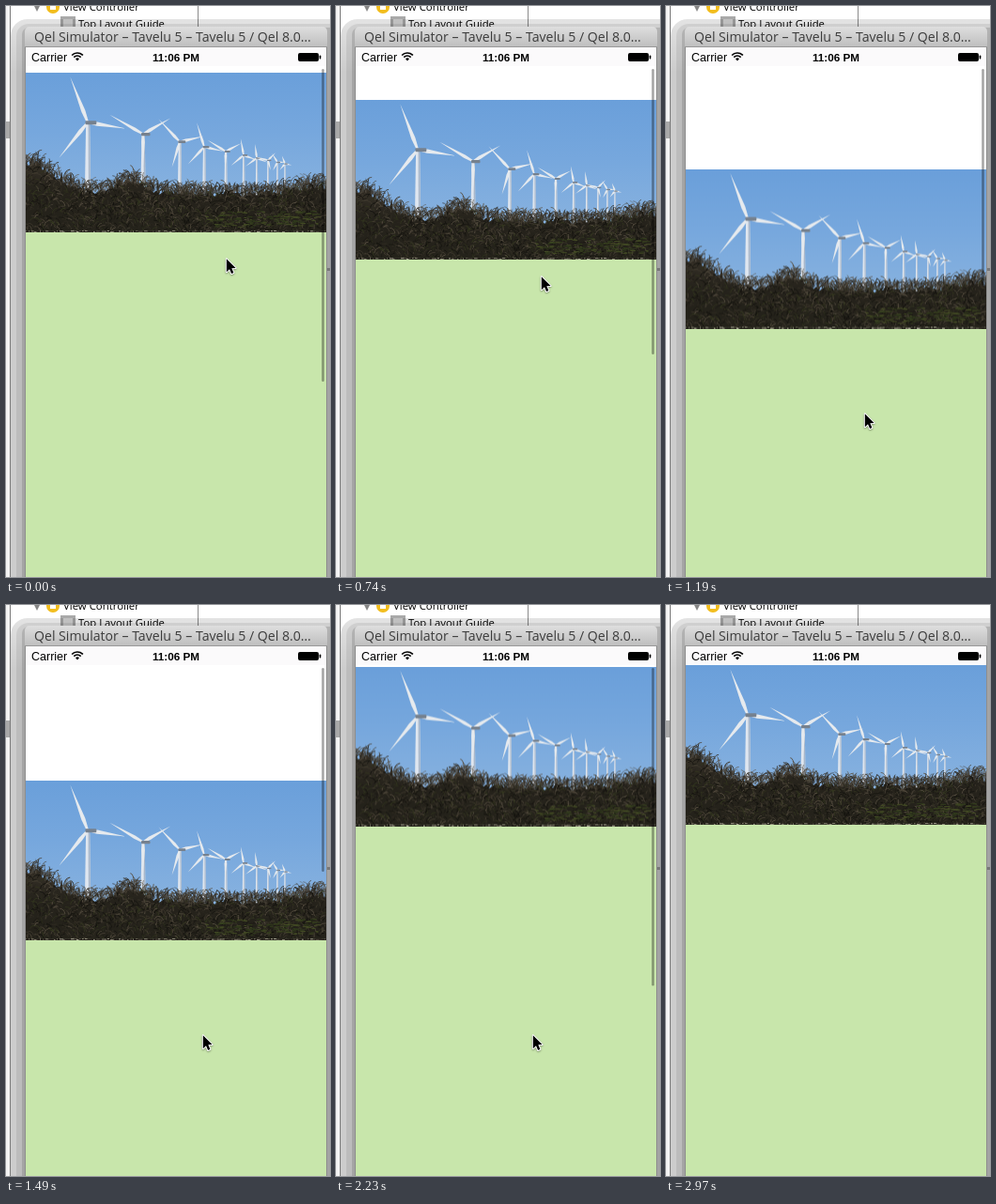
An HTML page with a canvas that plays this animation: 345 by 608 pixels, repeating every 3.25 s.

```html
<!DOCTYPE html>
<html lang="en">
<head>
<meta charset="utf-8">
<title>Pull to scroll</title>
<style>
  html, body { margin: 0; width: 100%; height: 100%; overflow: hidden; background: #fff; }
  canvas { display: block; width: 345px; height: 608px; }
</style>
</head>
<body>
<canvas id="stage" width="345" height="608"></canvas>
<script>
const W = 345, H = 608, LOOP = 3250;
const TICK = 148.5;   // the screen refreshes in even ticks
const REST = 64;      // photo top when nothing is pulled
const RELEASE = 13;   // tick at which the photo springs back
const ctx = document.getElementById('stage').getContext('2d');

// key points by tick: pulled distance, then pointer position
const PULL = [[4, 0], [5, 36], [6, 74], [7, 74], [8, 109.5], [9, 122], [10, 123]];
const HAND = [
  [0, 234, 268], [2, 243, 165], [3, 222, 175], [4, 222, 175], [5, 218, 287], [6, 216, 326],
  [7, 215, 325], [8, 211, 433], [9, 209, 457], [17, 209, 457], [18, 270, 603], [20, 271, 609]
];

function follow(keys, n) {
  const i = keys.findIndex(k => k[0] >= n);
  if (i < 0) return keys[keys.length - 1].slice(1);
  if (i === 0) return keys[0].slice(1);
  const a = keys[i - 1], b = keys[i], u = (n - a[0]) / (b[0] - a[0]);
  return a.slice(1).map((v, j) => v + (b[j + 1] - v) * u);
}

const halfPixel = v => Math.floor(v * 2) / 2;

function pullAt(n) {
  if (n < 4) return halfPixel(7 * Math.exp(-1.25 * n));
  if (n >= RELEASE) return halfPixel(36 * Math.exp(-1.5 * (n - RELEASE)));
  return follow(PULL, n)[0];
}

function layer(w, h, paint) {
  const c = document.createElement('canvas');
  c.width = w;
  c.height = h;
  paint(c.getContext('2d'));
  return c;
}

function random(seed) {
  return () => {
    seed = (seed * 1664525 + 1013904223) >>> 0;
    return seed / 4294967296;
  };
}

function rect(g, color, x, y, w, h) {
  g.fillStyle = color;
  g.fillRect(x, y, w, h);
}

function rounded(g, color, x, y, w, h, r) {
  g.fillStyle = color;
  g.beginPath();
  g.roundRect(x, y, w, h, r);
  g.fill();
}

function poly(g, color, pts) {
  g.fillStyle = color;
  g.beginPath();
  pts.forEach(([x, y]) => g.lineTo(x, y));
  g.closePath();
  g.fill();
}

function disc(g, color, x, y, r) {
  g.fillStyle = color;
  g.beginPath();
  g.arc(x, y, r, 0, 7);
  g.fill();
}

function label(g, str, x, y, font, color = '#000') {
  g.font = font;
  g.fillStyle = color;
  g.fillText(str, x, y);
}

function gradient(g, y0, y1, ...colors) {
  const fill = g.createLinearGradient(0, y0, 0, y1);
  colors.forEach((c, i) => fill.addColorStop(i / (colors.length - 1), c));
  return fill;
}

const UI = '"Open Sans", "Noto Sans", sans-serif';
const PHONE = '"Liberation Sans", Arial, sans-serif';

function paintWindow(g) {
  rect(g, '#fff', 0, 0, W, H);
  rect(g, '#f3f3f3', 0, 0, 4, H);
  rect(g, '#a8a8a8', 0, 123, 4, 18);
  rect(g, '#7c7c7c', 4, 0, 1, H);
  rect(g, '#8c8c8c', 204, 0, 1, 22);

  poly(g, '#868686', [[29, -2], [37, -2], [33, 6]]);
  disc(g, '#f2bd1d', 50, 1, 7);
  rect(g, '#fff', 47, -2, 6, 6);
  label(g, 'View Controller', 61, 5, '500 11.4px ' + UI);
  rect(g, '#a9a9a9', 58, 11, 16, 14);
  rect(g, '#d8d8d8', 61, 14, 10, 9);
  label(g, 'Top Layout Guide', 77, 23, '500 11.3px ' + UI);

  // stepped window shadow, lighter along the top
  const shade = gradient(g, 14, 70, 'rgba(0,0,0,.11)', 'rgba(0,0,0,.2)');
  rounded(g, shade, 5, 14, 370, 640, 18);
  rounded(g, 'rgba(0,0,0,.08)', 11, 19, 360, 640, 13);
  rounded(g, 'rgba(0,0,0,.13)', 17, 23, 340, 640, 7);
  rect(g, '#777', 341, 279, 4, 3);

  rounded(g, gradient(g, 22, 44, '#dedede', '#bdbdbd'), 20, 22, 322, 23, [5, 5, 0, 0]);
  rect(g, '#999', 20, 43, 322, 1);
  label(g, 'Qel Simulator – Tavelu 5 – Tavelu 5 / Qel 8.0…', 30, 38, '500 14.1px ' + UI, '#3c3c3c');
  rect(g, '#8e8e8e', 20, 44, 1, H);
  rect(g, '#8e8e8e', 341, 44, 1, H);
  rect(g, '#fff', 21, 44, 320, H);
  rect(g, '#fbfafb', 21, 44, 320, 20);
  paintStatus(g);
}

function paintStatus(g) {
  label(g, 'Carrier', 27, 59, '12.5px ' + PHONE);
  label(g, '11:06 PM', 156, 59, 'bold 11.7px ' + PHONE);
  const from = -Math.PI * 0.76, to = -Math.PI * 0.24;
  g.strokeStyle = '#000';
  g.lineWidth = 1.7;
  [8, 5].forEach(r => {
    g.beginPath();
    g.arc(76, 58, r, from, to);
    g.stroke();
  });
  g.beginPath();
  g.moveTo(76, 58.5);
  g.arc(76, 58, 2.7, from, to);
  g.fill();
  rounded(g, '#000', 311, 50, 22, 9, 2);
  rounded(g, '#000', 333.7, 52.5, 1.6, 4, 1);
}

const bump = (x, center, width) => Math.exp(-(((x - center) / width) ** 2));

const ridge = x => 119 - 33 * bump(x, 0, 42) - 15 * bump(x, 112, 20) - 8 * bump(x, 308, 28);

// a receding row: size and height follow from the distance along it
const ROW = [66, 125, 164, 190, 213, 232, 246, 258, 268, 276];
const TURN = [-111, -150, -133, -107, -148, -100, -97, -165, -121, -110];

function paintTurbine(g, x, turn) {
  const y = 53 + (x - 66) * 0.21;
  const reach = 4 + (300 - x) * 0.185;
  const w = 1 + reach * 0.11, foot = ridge(x) + 12;
  poly(g, '#dfe6ef', [[x - w * 0.3, y], [x + w * 0.35, y], [x + w / 2, foot], [x - w / 2, foot]]);
  poly(g, '#a9b8cb', [[x + w * 0.1, y], [x + w * 0.35, y], [x + w / 2, foot], [x + w * 0.15, foot]]);
  for (let k = 0; k < 3; k++) {
    const a = (turn + k * 120) * Math.PI / 180;
    const len = reach * (1 - 0.12 * Math.cos(a) - 0.06 * Math.sin(a));
    const half = 0.4 + w * 0.28;
    g.save();
    g.translate(x, y);
    g.rotate(a);
    poly(g, '#e6eaee', [[0, half * 0.5], [len * 0.25, half], [len, 0], [len * 0.25, -half], [0, -half * 0.5]]);
    g.restore();
  }
  rounded(g, '#76818e', x - w * 0.4, y - w * 0.3, w * 1.9, w * 0.65, 1);
}

function paintPhoto(g) {
  const rnd = random(41);
  const pick = list => list[Math.floor(rnd() * list.length)];

  function twig(x, y, dx, dy, color) {
    g.strokeStyle = color;
    g.lineWidth = 0.4 + rnd() * 0.6;
    g.beginPath();
    g.moveTo(x, y);
    g.quadraticCurveTo(x + dx * 0.2, y + dy, x + dx, y + dy);
    g.stroke();
  }

  rect(g, gradient(g, 0, 125, '#6a9fda', '#76a7dd', '#86b1df'), 0, 0, 320, 170);
  ROW.forEach((x, i) => paintTurbine(g, x, TURN[i]));

  // solid scrub, bare twigs along its edge, loose twigs inside
  const edge = [[0, 170]];
  for (let x = 0; x <= 320; x += 2) edge.push([x, ridge(x) + 5 + rnd() * 8]);
  poly(g, gradient(g, 85, 170, '#3b352b', '#25221b', '#24221a'), [...edge, [320, 170]]);

  const dark = ['#2a261f', '#37322a', '#4a4439', '#5b554b'];
  const tones = ['#12110d', '#1a1813', '#2b271f', '#3d372c', '#544c3f', '#33371f'];
  for (let i = 0; i < 900; i++) {
    const x = rnd() * 320;
    twig(x, ridge(x) + 5 + rnd() * 9, rnd() * 16 - 7, -3 - rnd() * 8, pick(dark));
  }
  for (let i = 0; i < 1900; i++) {
    const x = rnd() * 320, top = ridge(x) + 10;
    twig(x, top + rnd() * (169 - top), rnd() * 14 - 7, -1 - rnd() * 5, pick(tones));
  }
  for (let i = 0; i < 150; i++) {
    rect(g, pick(['#424a24', '#303a1c']), 190 + rnd() * 120, 147 + rnd() * 17, 2 + rnd() * 5, 1);
  }
  // pale ground along the bottom
  for (let x = 0; x < 320; x += 3) {
    rect(g, pick(['#8d8a78', '#5c594b', '#a9a795', '#3a382e']), x, 168 + rnd(), 1 + rnd() * 3, 1);
  }
}

const ARROW = [[0, 0], [0, 14], [3.2, 11], [5.3, 15.8], [7.6, 14.8], [5.5, 10.1], [9.8, 9.9]];

function paintPointer(x, y) {
  ctx.save();
  ctx.translate(x + 0.8, y + 1.2);
  ctx.shadowColor = 'rgba(0,0,0,.35)';
  ctx.shadowBlur = 2;
  ctx.shadowOffsetY = 1;
  ctx.lineJoin = 'round';
  ctx.lineWidth = 2;
  ctx.strokeStyle = '#fff';
  ctx.beginPath();
  ARROW.forEach(p => ctx.lineTo(...p));
  ctx.closePath();
  ctx.stroke();
  ctx.shadowColor = 'transparent';
  poly(ctx, '#000', ARROW);
  ctx.restore();
}

const backdrop = layer(W, H, paintWindow);
const photo = layer(320, 170, paintPhoto);

function draw(now) {
  const n = Math.floor((now % LOOP + 5.5) / TICK);
  // the photo stays at full stretch until it is let go
  const pull = pullAt(n), top = REST + pull;
  ctx.drawImage(backdrop, 0, 0);
  rect(ctx, '#c8e6ab', 21, top + 170, 320, H);
  ctx.drawImage(photo, 21, top);
  // the bar lingers one tick after the photo comes to rest
  const moving = pull > 0 || (n > 0 && pullAt(n - 1) > 0);
  if (moving) rounded(ctx, 'rgba(0,0,0,.36)', 336.25, 67, 2.5, 404 - top, 1.25);
  if (n < 20) paintPointer(...follow(HAND, n));
}

const start = performance.now();
function tick() {
  draw(performance.now() - start);
  requestAnimationFrame(tick);
}
tick();
</script>
</body>
</html>
```
